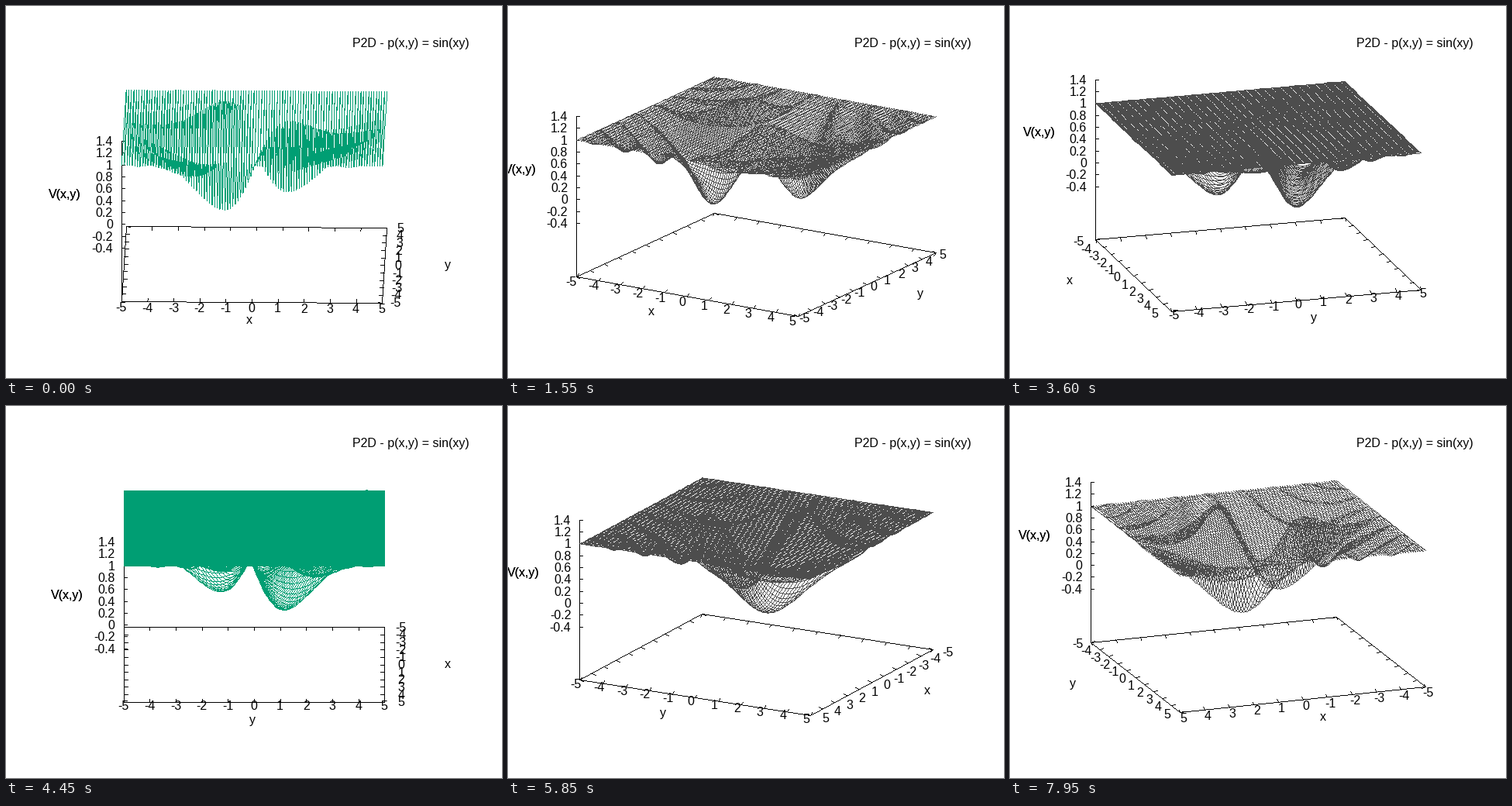
These frames come from a looping animation (640x480 px, 8 s). A matplotlib script:

```python
import numpy as np
import matplotlib
import matplotlib.pyplot as plt
from matplotlib.animation import FuncAnimation

matplotlib.rcParams["font.family"] = "Liberation Sans"

W, H, DPI = 640, 480, 80
FRAMES, STEP_MS = 160, 50
PT = 72 / DPI                       # points per pixel
CX, CY = 320, 333.5                 # screen centre of the base plane
SX, SY, SZ = 168.3, 48.2, 76.56     # half width, half depth, height of one unit
Z_BASE, Z_TOP = -1.3, 1.4
GREEN, GREY, BLACK = (0, 158, 115), (77, 77, 77), (0, 0, 0)


def solve_potential(n=100, half=5.0, gain=2.0, sag=0.55):
    """Poisson problem lap(V) = gain * sin(xy), V = 1 on the edge, not fully relaxed."""
    g = np.linspace(-half, half, n + 1)
    k = np.arange(1, n)
    s = np.sin(np.pi * np.outer(k, k) / n)
    lam = (2 - 2 * np.cos(np.pi * k / n)) / (2 * half / n) ** 2
    rho = gain * np.sin(np.outer(g[1:-1], g[1:-1]))
    coef = s @ rho @ s * (2 / n) ** 2 / (lam[:, None] + lam[None, :])
    v = np.ones((n + 1, n + 1))
    v[1:-1, 1:-1] -= s @ coef @ s
    c = np.cos(np.pi * g / (2 * half))
    return g, v - sag * np.outer(c, c)


# One continuous stroke: along y for each x, then straight back to the next x.
GRID, V = solve_potential()
GX, GY = (a.ravel() for a in np.meshgrid(GRID, GRID, indexing="ij"))
GZ = V.ravel()


def project(x, y, z, c, s):
    px = CX + SX * (c * x + s * y) / 5
    py = CY + SY * (s * x - c * y) / 5 - SZ * (z - Z_BASE)
    return px, py


def plot_lines(img, start, end, color):
    """Draw one-pixel lines without smoothing."""
    a = np.floor(np.asarray(start) + 0.5)
    d = np.floor(np.asarray(end) + 0.5) - a
    n = np.maximum(np.abs(d).max(axis=1), 1).astype(int)
    seg = np.repeat(np.arange(len(n)), n + 1)
    first = np.cumsum(n + 1) - (n + 1)
    t = (np.arange(len(seg)) - first[seg]) / n[seg]
    p = np.floor(a[seg] + d[seg] * t[:, None] + 0.5).astype(int)
    p = p[((p >= 0) & (p < (W, H))).all(axis=1)]
    img[p[:, 1], p[:, 0]] = color


fig = plt.figure(figsize=(W / DPI, H / DPI), dpi=DPI, facecolor="white")
ax = fig.add_axes([0, 0, 1, 1])
canvas = np.full((H, W, 3), 255, np.uint8)
picture = ax.imshow(canvas, extent=(0, W, H, 0), aspect="auto",
                    interpolation="nearest")
ax.set_xlim(0, W)
ax.set_ylim(H, 0)
ax.axis("off")


def label(text, ha="center"):
    return ax.text(0, 0, text, fontsize=16 * PT, ha=ha, va="baseline")


ticks = range(-5, 6)
x_labels = [label(str(t)) for t in ticks]
y_labels = [label(str(t)) for t in ticks]
z_ticks = [k / 5 for k in range(-2, 8)]
z_labels = [label(f"{t:g}", "right") for t in z_ticks]
x_title, y_title = label("x"), label("y")
z_titles = [label("V(x,y)") for _ in range(2)]
label("P2D - p(x,y) = sin(xy)", "right").set_position((597.5, 52.5))


def draw(i):
    rot = i + 1
    c, s = np.cos(np.radians(rot)), np.sin(np.radians(rot))
    side = -1 if rot < 90 else 1     # edge carrying the x axis

    def base(x, y):
        return np.array(project(x, y, Z_BASE, c, s))

    corners = [base(*p) for p in ((-5, -5), (5, -5), (5, 5), (-5, 5))]
    segs = [(corners[k], corners[(k + 1) % 4]) for k in range(4)]
    along_x = np.array([5 * c, 4 * s])
    along_y = np.array([5 * s, -4 * c])
    for t in ticks:
        for e in (-5, 5):
            p, q = base(t, e), base(e, t)
            segs.append((p, p - np.sign(e) * along_y))
            segs.append((q, q - np.sign(e) * along_x))

    zx, zy = corners[0] if rot < 90 else corners[1]
    segs.append(((zx, zy), (zx, zy - SZ * (Z_TOP - Z_BASE))))
    for t, txt in zip(z_ticks, z_labels):
        h = zy - SZ * (t - Z_BASE)
        segs.append(((zx, h), (zx + 4, h)))
        txt.set_position((zx - 11, h + 6))

    canvas[:] = 255
    plot_lines(canvas, *zip(*segs), BLACK)
    near_axis = rot <= 5 or abs(rot - 90) <= 5
    path = np.stack(project(GX, GY, GZ, c, s), -1)
    plot_lines(canvas, path[:-1], path[1:], GREEN if near_axis else GREY)
    picture.set_data(canvas)

    x_off = np.array([side * (12 * s + 9.5 * (s > 0.6)), 8 * abs(c) + 5.5])
    y_off = np.array([10.5 * c + 7 * np.sign(c) * (abs(c) > 0.9), 5.2 * s + 5.5])
    for t, xt, yt in zip(ticks, x_labels, y_labels):
        xt.set_position(base(t, 5 * side) + x_off)
        yt.set_position(base(5, t) + y_off)

    mid_x, mid_y = base(0, 5 * side), base(5, 0)
    x_title.set_position(mid_x + (83.5 * side * s - 2, 23.7 * abs(c) + 4.5))
    y_title.set_position(mid_y + (83.5 * c - 2, 23.7 * s + 4.5))
    for txt in z_titles:
        txt.set_position((zx - 72.5, zy - 133))
    return []


anim = FuncAnimation(fig, draw, frames=FRAMES, interval=STEP_MS,
                     init_func=lambda: [], repeat=True, repeat_delay=0)
plt.show()
```
